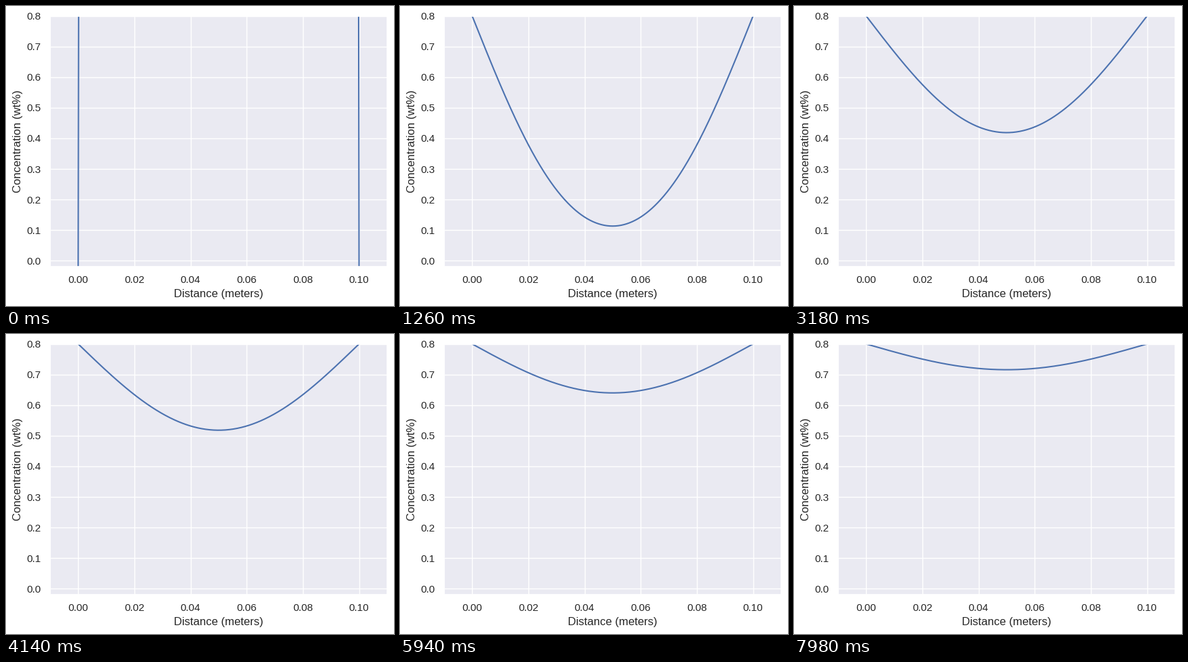
Recreate the animation shown at these times as a matplotlib script. Size 571x442 px, loop 8000 ms.

```python
import numpy as np
import matplotlib.pyplot as plt
from matplotlib.animation import FuncAnimation

W, H, DPI = 571, 442, 100
TICK = 20            # ms per animation frame
STEP = 60            # ms between solver outputs
LOOP = 8000

SURFACE = 0.8        # fixed concentration at both faces
LENGTH = 0.1
RATE = 3.149e-4      # decay of the first harmonic, per ms
INK = "0.15"

plt.rcParams.update({
    "font.family": "Liberation Sans",
    "font.size": 12,
    "axes.unicode_minus": False,
})

fig = plt.figure(figsize=(W / DPI, H / DPI), dpi=DPI, facecolor="white")
LEFT, TOP, AX_W, AX_H = 64.9, 14.7, 496, 369.6
ax = fig.add_axes([LEFT / W, 1 - (TOP + AX_H) / H, AX_W / W, AX_H / H],
                  facecolor="#EAEAF2")
ax.set_axisbelow(True)
ax.grid(color="white", linewidth=1, solid_capstyle="round")
ax.tick_params(length=0, pad=9.5, labelsize=11, labelcolor=INK)
for spine in ax.spines.values():
    spine.set(color="white", linewidth=1.25)

ax.set(xlim=(-0.01, 0.11), ylim=(-0.02, SURFACE))
ax.set_xticks(np.arange(6) * 0.02)
ax.set_yticks(np.arange(9) * 0.1)
ax.xaxis.set_major_formatter("{x:.2f}")
ax.yaxis.set_major_formatter("{x:.1f}")
ax.set_xlabel("Distance (meters)", color=INK)
ax.set_ylabel("Concentration (wt%)", color=INK)

curve, = ax.plot([], [], color="#4C72B0", linewidth=1.5,
                 solid_capstyle="round")

x = np.linspace(0, LENGTH, 501)
odd = np.arange(1, 200, 2)
modes = np.sin(np.outer(x, odd) * np.pi / LENGTH) / odd

# Near-vertical jumps at the two faces before diffusion begins
LEAN = 0.00015
jump_x = [0, LEAN, np.nan, LENGTH - LEAN, LENGTH]
jump_y = [-0.02, SURFACE, np.nan, SURFACE, -0.02]


def profile(elapsed):
    """Fourier solution for a slab filled from both faces."""
    return SURFACE * (1 - 4 / np.pi * modes @ np.exp(-RATE * odd**2 * elapsed))


def update(frame):
    step = frame * TICK // STEP
    if step < 2:
        curve.set_data(jump_x, jump_y)
    else:
        curve.set_data(x, profile((step - 1) * STEP))
    return curve,


anim = FuncAnimation(fig, update, frames=LOOP // TICK, interval=TICK,
                     init_func=lambda: update(0), repeat=True,
                     repeat_delay=0)
plt.show()
```
